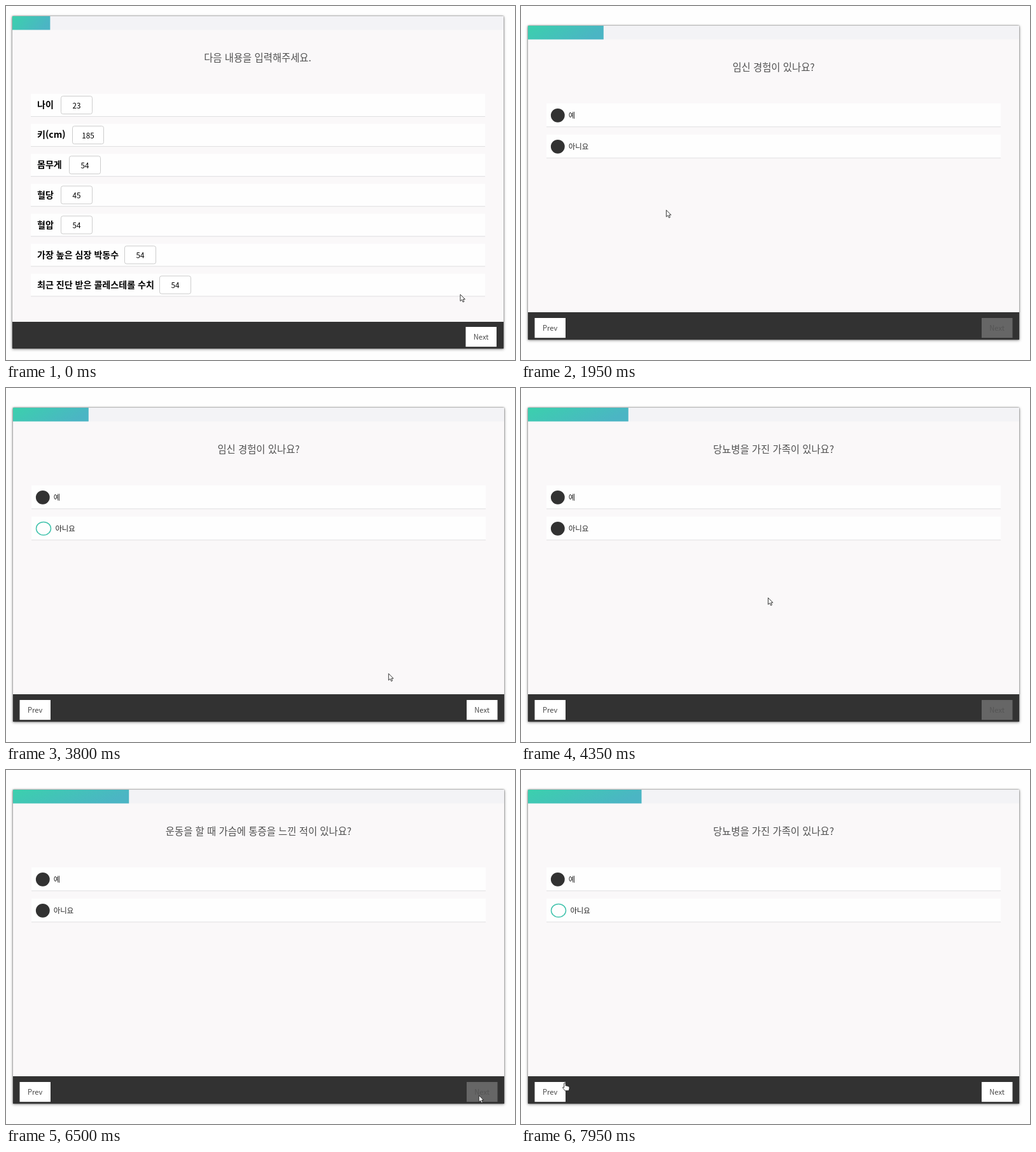
These frames come from a looping animation (800x556 px, 8000 ms). An HTML page:

```html
<!DOCTYPE html>
<html lang="ko">
<head>
<meta charset="utf-8">
<style>
  html, body { margin: 0; width: 800px; height: 556px; overflow: hidden; background: #fefefe; }
  svg { display: block; font-family: "Noto Sans CJK KR", "Noto Sans CJK", "Noto Sans", sans-serif; }
  .panel { fill: #faf8f9; filter: drop-shadow(0 0 1px #0008) drop-shadow(0 1px 2px #0006); }
  .track { fill: #f3f3f6; }
  .footer, .dot { fill: #323232; }
  .row { fill: #fefefe; }
  .line { fill: #e0e0e2; }
  .title { font-size: 15.4px; fill: #505050; text-anchor: middle; }
  .label { font-size: 14.07px; font-weight: 700; }
  .value { font-size: 11.7px; text-anchor: middle; }
  .input { fill: #fff; stroke: #ccc; }
  .option { font-size: 11.4px; fill: #222; }
  .ring { fill: #fefefe; stroke: #45c4ae; stroke-width: 1.5; }
  .button { font-size: 11.1px; text-anchor: middle; fill: #484848; }
  .cursor { fill: #fff; stroke: #222; stroke-width: .9; stroke-linejoin: round; }
</style>
</head>
<body>
<svg id="stage" width="800" height="556"></svg>
<script>
const LOOP = 8000, BAR_TIME = 500, STEP = 772 / 13;
const stage = document.getElementById('stage');

const fields = {
  '나이': 23, '키(cm)': 185, '몸무게': 54, '혈당': 45, '혈압': 54,
  '가장 높은 심장 박동수': 54, '최근 진단 받은 콜레스테롤 수치': 54
};
const family = '당뇨병을 가진 가족이 있나요?';
const pages = [
  { start: 0, title: '다음 내용을 입력해주세요.', from: 1, to: 1 },
  { start: 1270, title: '임신 경험이 있나요?', from: 1, to: 2, pick: 3450 },
  { start: 4160, title: family, from: 2, to: 3, pick: 5650 },
  { start: 6460, title: '운동을 할 때 가슴에 통증을 느낀 적이 있나요?', from: 3, to: 4, pick: LOOP },
  { start: 7500, title: family, from: 4, to: 3, pick: 7500 }
];
// pointer moves: start time, end time, destination
const next = [745, 511];
const moves = [
  [50, 850, next], [1270, 1950, [229, 321]], [1950, 2450, [66, 216]],
  [3450, 4100, next], [4160, 4350, [390, 330]], [4350, 4800, [32, 224]],
  [5000, 5250, [78, 226]], [5650, 6400, next], [6500, 7300, [45, 503]], [7500, 7900, [69, 491]]
];

const mix = (a, b, k) => a + (b - a) * k;
const rect = (cls, x, y, w, h, extra = '') =>
  `<rect class="${cls}" x="${x}" y="${y}" width="${w}" height="${h}" ${extra}/>`;
const text = (cls, x, y, str, extra = '') => `<text class="${cls}" x="${x}" y="${y}" ${extra}>${str}</text>`;

const pen = document.createElement('canvas').getContext('2d');
pen.font = '700 14.07px "Noto Sans CJK KR", "Noto Sans CJK", "Noto Sans", sans-serif';

// cubic-bezier(.25, .1, .25, 1)
function ease(x) {
  const curve = (p, q, u) => 3 * p * u * (1 - u) ** 2 + 3 * q * u * u * (1 - u) + u ** 3;
  let lo = 0, hi = 1;
  for (let i = 0; i < 20; i++) {
    const mid = (lo + hi) / 2;
    if (curve(.25, .25, mid) < x) lo = mid; else hi = mid;
  }
  return curve(.1, 1, lo);
}

// A move brakes at its end unless the next one follows at once.
function pointer(t) {
  let at = [714, 453];
  moves.forEach(([start, end, target], i) => {
    if (t <= start) return;
    const u = Math.min(1, (t - start) / (end - start));
    const flowing = moves[i + 1]?.[0] === end;
    const k = flowing ? u : 1 - (1 - u) ** 2;
    at = at.map((v, axis) => mix(v, target[axis], k));
  });
  return at;
}

function frame(x, y, h, footerY, bar) {
  return rect('panel', x, y, 772, h) + rect('track', x, y, 772, 21.5) +
    rect('bar', x, y, bar, 21.5, 'fill="url(#teal)"') + rect('footer', x, footerY, 772, y + h - footerY);
}

function row(x, y, h) {
  return rect('row', x, y, 714, h) + rect('line', x, y + h, 714, 1);
}

function button(x, y, str, enabled = true) {
  return rect('', x, y, 48.5, 31.2, `fill="${enabled ? '#fff' : '#666'}"`) +
    text('button', x + 24.1, y + 20.2, str, enabled ? '' : 'style="fill:#555"');
}

function form(title, bar) {
  const rows = Object.entries(fields).map(([label, value], i) => {
    const y = 138 + i * 47.07, x = Math.round(59.8 + pen.measureText(label).width);
    return row(39, y, 35) + text('label', 49, y + 22.3, label) +
      rect('input', x + .5, y + 3.6, 49, 28, 'rx="3"') + text('value', x + 25, y + 22.5, value);
  });
  return frame(10, 16, 522, 496, bar) + text('title', 395.5, 86.8, title) + rows.join('') + button(722.5, 504, 'Next');
}

function question(title, bar, picked) {
  const options = ['예', '아니요'].map((label, i) => {
    const y = 153 + i * 49, on = picked && i === 1;
    return row(40, y, 36.3) +
      (on ? `<ellipse class="ring" cx="59" cy="${y + 18.7}" rx="11.5" ry="10.3"/>`
          : `<circle class="dot" cx="57.8" cy="${y + 18.8}" r="10.9"/>`) +
      text('option', on ? 77.4 : 74.8, y + 22.6, label);
  });
  return frame(11, 31, 493, 481, bar) + text('title', 397, 101.8, title) + options.join('') +
    button(21.5, 490, 'Prev') + button(724, 490, 'Next', picked);
}

function cursor(x, y, hand) {
  const d = hand
    ? 'M-1.3 1Q0-.8 1.2 1V5Q2.4 4.2 3.2 5.4 4.6 4.7 5.2 6 6.9 5.5 7 7.2V9.5Q6.6 11.5 5.8 12.8H.2Q-1.5 10.5-3.4 8.2-3.6 6.2-1.3 7.6Z'
    : 'M0 0V10.5L2.5 8.2 4.2 12 6 11.2 4.4 7.6H7.5Z';
  return `<path class="cursor" transform="translate(${x} ${y})" d="${d}"/>`;
}

function scene(t) {
  const page = pages.findLast(p => p.start <= t), { start, title, from, to, pick } = page;
  const isForm = page === pages[0], picked = t >= pick;
  const bar = STEP * mix(from, to, ease(Math.min(1, (t - start) / BAR_TIME)));
  const [x, y] = pointer(t);
  const overOption = !isForm && x > 46 && x < 110 && (y > 153 && y < 190 || y > 202 && y < 239);
  const overButton = y > 489 && y < 536 && (x > 722 && x < 774 && (isForm || picked) || !isForm && x > 21 && x < 71);
  return '<defs><linearGradient id="teal" y2=".3"><stop stop-color="#3bd0ad"/><stop offset="1" stop-color="#4bb5c4"/></linearGradient></defs>' +
    (isForm ? form(title, bar) : question(title, bar, picked)) + cursor(x, y, overOption || overButton);
}

function tick() {
  stage.innerHTML = scene(performance.now() % LOOP);
  requestAnimationFrame(tick);
}
tick();
</script>
</body>
</html>
```
